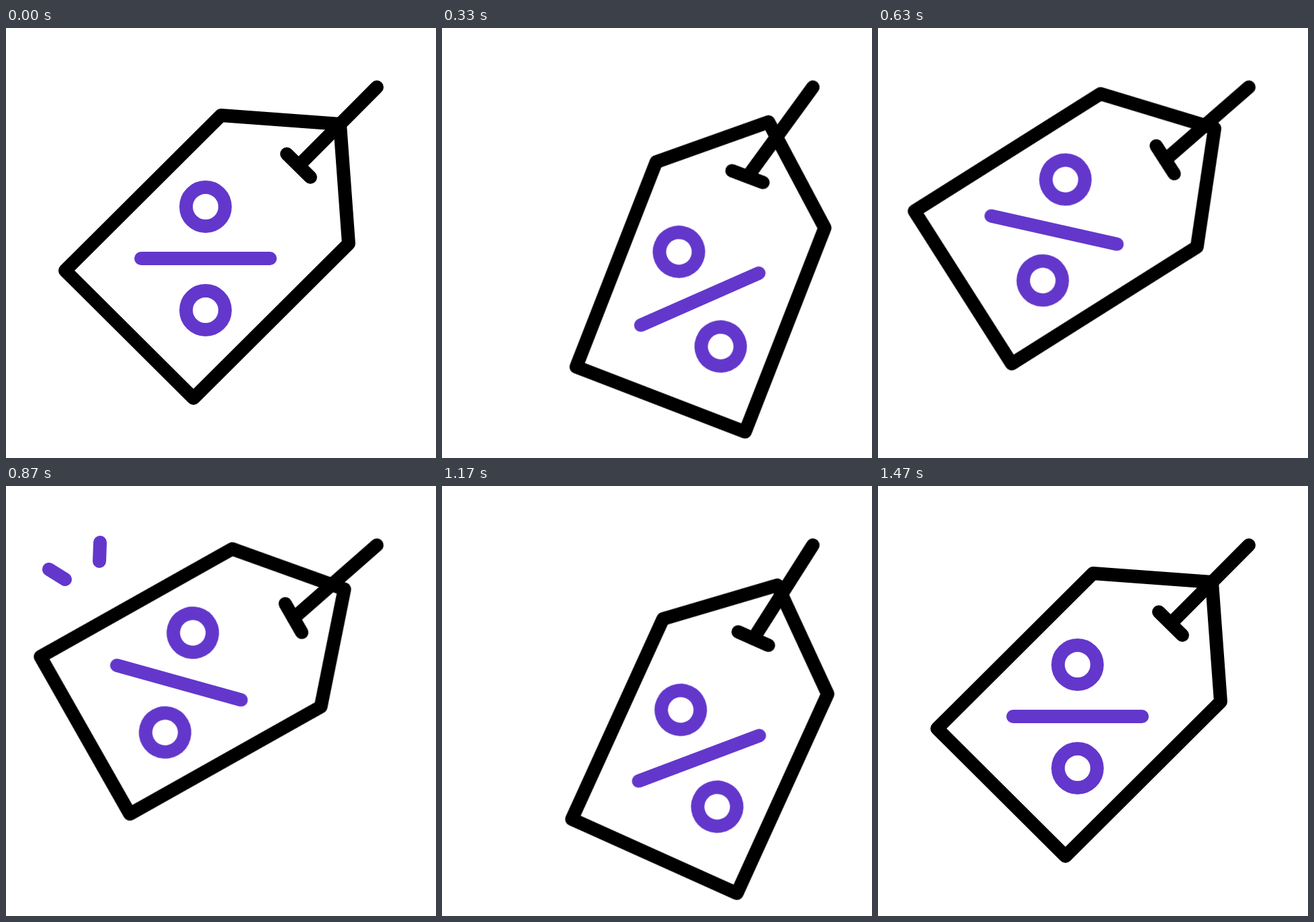
Write an HTML page without scripts that moves like this. It is 640 px wide and 640 px high and loops after 2000 ms.

```html
<!DOCTYPE html>
<html lang="en">
<head>
<meta charset="utf-8">
<title>Swinging price tag</title>
<style>
  html, body {
    margin: 0;
    width: 100%;
    height: 100%;
    overflow: hidden;
    background: #fff;
  }
  svg {
    display: block;
    width: 100%;
    height: 100%;
    fill: none;
    stroke: #000;
    stroke-width: 20;
    stroke-linecap: round;
    stroke-linejoin: round;
  }
  .accent { stroke: #6337cb; }

  .string, .tag, .spark {
    animation: 2s cubic-bezier(.333, 0, .667, 1) infinite;
  }
  .string { transform-origin: 552px 88px; animation-name: swing; }
  .tag { transform-origin: 435.5px 205px; animation-name: flap; }
  .spark { stroke-dasharray: 10 30; animation-name: burst; }

  @keyframes swing {
    0%, 73.33%, 100% { transform: rotate(0deg); }
    16.67% { transform: rotate(-8.8deg); }
    38.33% { transform: rotate(8deg); }
    56.67% { transform: rotate(-12.9deg); }
  }
  /* the tag trails the string, so its last swing peaks a little later */
  @keyframes flap {
    0%, 73.33%, 100% { transform: rotate(0deg); }
    16.67% { transform: rotate(-15deg); }
    38.33% { transform: rotate(15.7deg); }
    58.33% { transform: rotate(-8.2deg); }
  }
  /* grow outwards, then shrink towards the outer end */
  @keyframes burst {
    0%, 37.49% { opacity: 0; stroke-dashoffset: 10; }
    37.5% { opacity: 1; stroke-dashoffset: 10; }
    46.2%, 47% { opacity: 1; stroke-dashoffset: 0; }
    56.6% { opacity: 1; stroke-dashoffset: -10; }
    56.61%, 100% { opacity: 0; stroke-dashoffset: -10; }
  }
</style>
</head>
<body>
<svg viewBox="0 0 640 640">
  <g class="string">
    <path d="M552 88L436 204.5"/>
    <g class="tag">
      <path d="M320 130L497 143L510 321L279 551L88 361Z"/>
      <path d="M418 187.5L453 222"/>
      <g class="accent">
        <circle cx="297" cy="266" r="29"/>
        <path d="M201 343H393"/>
        <circle cx="297" cy="420" r="29"/>
      </g>
    </g>
  </g>
  <g class="accent">
    <path class="spark" pathLength="10" d="M88 139L57 119.7"/>
    <path class="spark" pathLength="10" d="M139 112L140.3 76"/>
  </g>
</svg>
</body>
</html>
```
